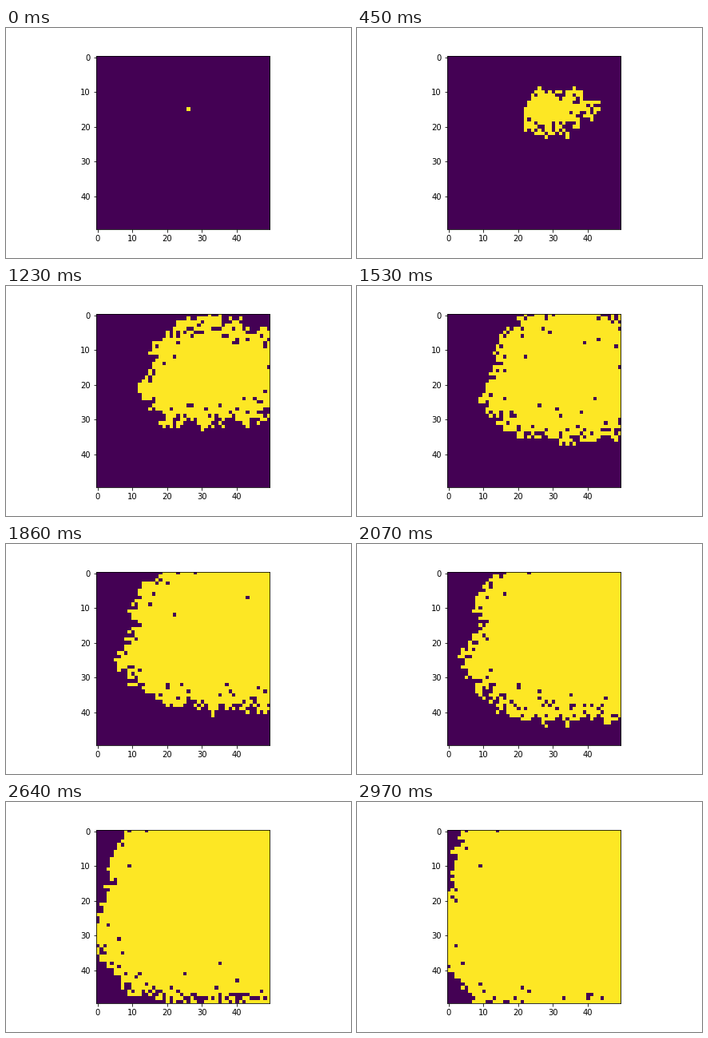
A matplotlib script for the animation above (3000 ms loop, 432x288 px).

```python
import numpy as np
import matplotlib.pyplot as plt
from matplotlib.animation import FuncAnimation

SIZE, STEPS = 50, 100
SEED_COL, SEED_ROW = 26, 15

# Front speed in cells per step, every 30 degrees clockwise from the right.
SPEED = [0.90, 0.62, 0.44, 0.375, 0.385, 0.36,
         0.25, 0.27, 0.25, 0.31, 0.38, 0.52]


def neighbours(grid):
    """The grid shifted to each of its 3 x 3 surrounding positions."""
    pad = np.pad(grid, 1)
    return [pad[r:r + SIZE, c:c + SIZE] for r in range(3) for c in range(3)]


def arrival():
    """Mean step at which the front reaches each cell."""
    rows, cols = np.mgrid[:SIZE, :SIZE]
    dx, dy = cols - SEED_COL, rows - SEED_ROW
    angle = np.degrees(np.arctan2(dy, dx))
    speed = np.interp(angle, np.arange(0, 360, 30), SPEED, period=360)
    return np.hypot(dx, dy) / speed


def grow():
    rng = np.random.default_rng(7)
    front = arrival()
    patches = np.mean(neighbours(rng.normal(0, 7, (SIZE, SIZE))), axis=0)
    lag = rng.exponential(6, (SIZE, SIZE)) - 5 + patches
    due = front + lag * np.minimum(front / 20, 1)

    grid = np.zeros((SIZE, SIZE), bool)
    grid[SEED_ROW, SEED_COL] = True
    history = [grid.copy()]
    for step in range(1, STEPS):
        for _ in range(2):
            grid |= np.any(neighbours(grid), axis=0) & (due <= step)
        history.append(grid.copy())
    return history


history = grow()

fig = plt.figure(figsize=(6, 4), dpi=72, facecolor="white")
fig.subplots_adjust(left=0.125, right=0.9, bottom=0.125, top=0.88)
ax = fig.add_subplot()
image = ax.imshow(history[0].astype(float), cmap="viridis", vmin=0, vmax=1,
                  interpolation="nearest")
ax.set_xticks(range(0, SIZE, 10))
ax.set_yticks(range(0, SIZE, 10))


def update(step):
    image.set_data(history[step].astype(float))
    return [image]


anim = FuncAnimation(fig, update, frames=STEPS, interval=30,
                     repeat=True, repeat_delay=0)
plt.show()
```
